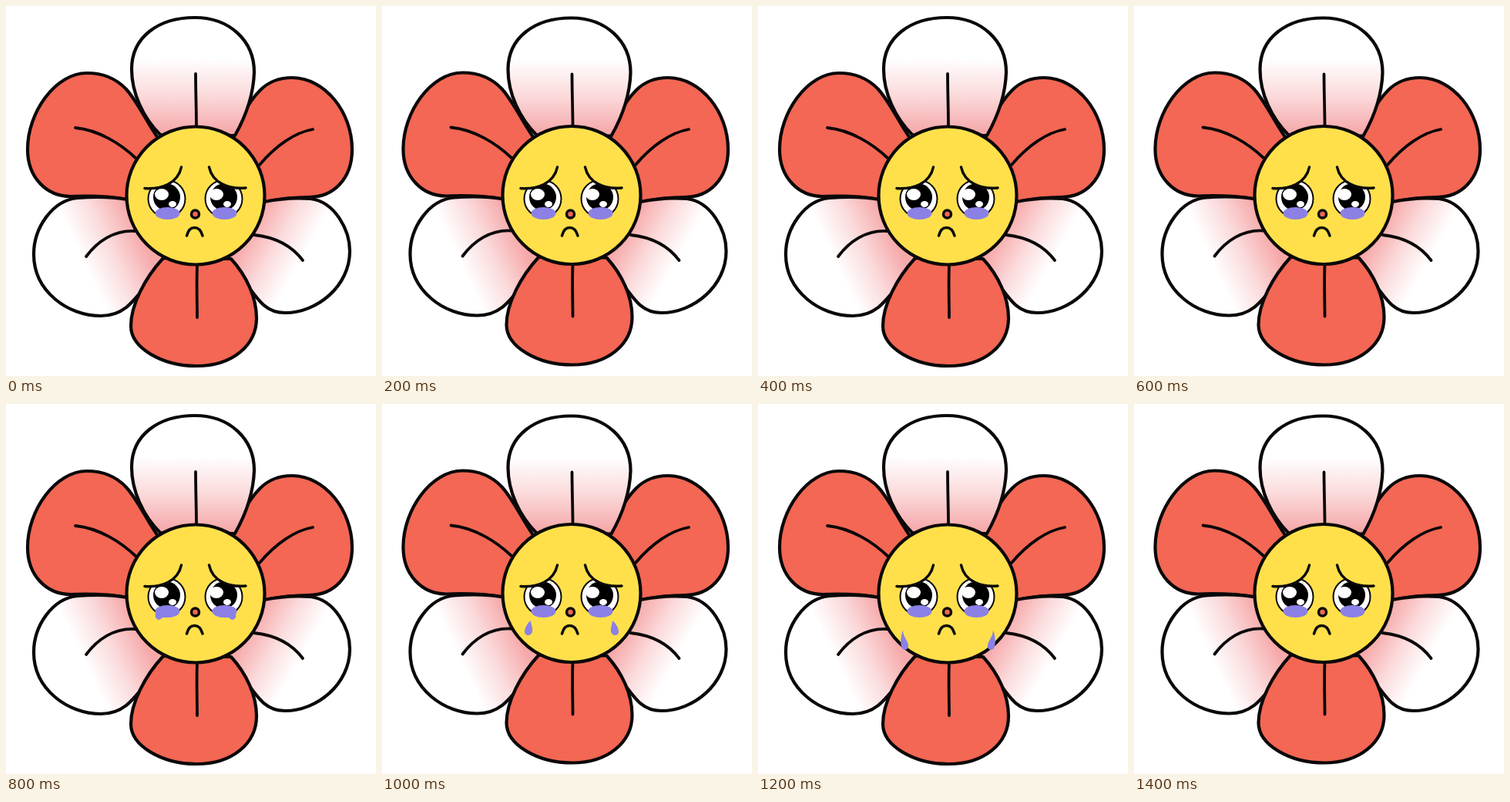
These frames come from a looping animation (480x480 px, 1.6 s). An HTML page:

```html
<!DOCTYPE html>
<html>
<head>
<meta charset="utf-8">
<style>
  html, body { margin: 0; width: 100%; height: 100%; overflow: hidden; background: #fff; }
  svg { display: block; width: 100vw; height: 100vh; }
  .ink { stroke: #0b0809; stroke-width: 4.2; stroke-linecap: round; stroke-linejoin: round; fill: none; }
  .vein { stroke-width: 3.8; }
  .red { fill: #f36754; }
  .tear { fill: #8b80e6; }
</style>
</head>
<body>
<svg viewBox="0 0 480 480">
  <defs>
    <linearGradient id="up" gradientUnits="userSpaceOnUse" x1="246" y1="164" x2="246" y2="68">
      <stop stop-color="#f5a8aa"/><stop offset=".5" stop-color="#fbdadb"/><stop offset="1" stop-color="#fff"/>
    </linearGradient>
    <linearGradient id="left" gradientUnits="userSpaceOnUse" x1="172" y1="292" x2="98" y2="327">
      <stop stop-color="#f6a9aa"/><stop offset=".5" stop-color="#fbdadb"/><stop offset="1" stop-color="#fff"/>
    </linearGradient>
    <linearGradient id="right" gradientUnits="userSpaceOnUse" x1="316" y1="291" x2="383" y2="329">
      <stop stop-color="#f6a9aa"/><stop offset=".5" stop-color="#fbdadb"/><stop offset="1" stop-color="#fff"/>
    </linearGradient>
    <clipPath id="lid">
      <path d="M180 237C202 239 223 230 228 209H245V290H170Z"/>
    </clipPath>
    <g id="eye" clip-path="url(#lid)">
      <circle class="ink" cx="208.500" cy="250" r="24" style="fill:#fff;stroke-width:2"/>
      <circle cx="208.500" cy="248" r="17.500"/>
    </g>
    <g id="shine" fill="#fff">
      <ellipse cx="202" cy="244.500" rx="9" ry="7.500"/>
      <ellipse cx="216" cy="257" rx="5" ry="4"/>
    </g>
  </defs>

  <g class="ink">
    <g data-shift="-.5 -.5">
      <path class="red" d="M202 178C184 155 173 127 156 108C141 92 123 87 105 87C64 87 28 138 28 186C28 222 52 247 84 247C112 246 135 247 158 251L200 225Z"/>
      <path class="vein" d="M90 158C120 161 148 178 169 198"/>
    </g>
    <g data-shift="0 0">
      <path class="red" d="M290 182C300 152 313 126 330 109C342 97 356 93 371 93C414 93 449 138 449 186C449 224 425 248 393 248C370 248 350 251 335 254L290 225Z"/>
      <path class="vein" d="M398 160C375 164 350 181 329 206"/>
    </g>
    <g data-shift=".5 .5">
      <path fill="url(#up)" d="M200 167C178 145 163 113 163 82C163 40 198 15 245 15C290 15 322 45 322 86C321 118 310 145 297 168Z"/>
      <path class="vein" d="M246 88C246 110 247 135 247 156"/>
    </g>
    <g data-shift=".5 -.5">
      <path fill="url(#left)" d="M157 251C135 247 115 247 93 249C60 252 36 288 36 322C36 370 80 402 123 402C163 402 172 368 210 330V290Z"/>
      <path class="vein" d="M104 325C118 306 140 290 168 292"/>
    </g>
    <g data-shift=".5 0">
      <path fill="url(#right)" d="M335 254C355 250 372 248 395 250C427 254 446 291 446 318C446 363 404 398 362 398C328 398 322 368 285 326V290Z"/>
      <path class="vein" d="M385 330C370 310 350 300 322 297"/>
    </g>
    <g data-shift="-.5 -1.5">
      <path class="red" d="M204 327C180 353 162 388 162 415C162 444 203 467 247 467C294 467 325 440 325 405C325 378 312 350 292 328Z"/>
      <path class="vein" d="M248 336C247 360 248 384 248 404"/>
    </g>
    <g data-shift="0 -.5"><circle cx="246" cy="246" r="89.5" fill="#ffe04b"/></g>
  </g>

  <use href="#eye"/>
  <use href="#eye" transform="matrix(-1 0 0 1 491 0)"/>
  <use href="#shine"/>
  <use href="#shine" x="71"/>
  <g class="ink" style="stroke-width:3.5">
    <path d="M180 236.500C202 238 223 230 227.500 209M263.500 209C268 230 289 238 311 236"/>
    <g data-shift="-1 0">
      <circle cx="245.500" cy="270" r="5" fill="#f36754"/>
      <path d="M234.500 298C238 284 251 284 255 298"/>
    </g>
  </g>

  <g class="tear">
    <ellipse cx="209.500" cy="269" rx="16" ry="8"/>
    <ellipse cx="283.500" cy="269" rx="16" ry="8"/>
    <g id="swell">
      <path d="M196 265Q193 270 194 277Q198 283 203 277Q222 278 225 268Q222 261 209 262Z"/>
      <path d="M296 265Q299 270 298 277Q294 283 289 277Q270 278 267 268Q271 261 284 262Z"/>
    </g>
    <g id="drops">
      <path d="M193 281C188 285 185 291 185 296C186 302 194 301 195 295C196 290 193 286 193 281Z"/>
      <path d="M299 281C304 285 307 291 307 296C306 302 298 301 297 295C296 290 299 286 299 281Z"/>
    </g>
    <g id="drips">
      <path d="M188 293C185 302 184 311 187 317C191 321 196 318 195 312C193 305 188 301 188 293Z"/>
      <path d="M305 293C308 302 309 311 306 317C302 321 297 318 298 312C300 305 305 301 305 293Z"/>
    </g>
  </g>
</svg>
<script>
  const STEP = 200, STEPS = 8;
  const wobbly = document.querySelectorAll('[data-shift]');
  const tearStep = { swell: 4, drops: 5, drips: 6 };

  function draw(now) {
    const step = Math.floor(now / STEP) % STEPS;
    for (const part of wobbly) {
      part.setAttribute('transform', step % 2 ? `translate(${part.dataset.shift})` : '');
    }
    for (const id in tearStep) {
      document.getElementById(id).style.display = step === tearStep[id] ? '' : 'none';
    }
  }

  let start;
  function tick(now) {
    start ??= now;
    draw(now - start);
    requestAnimationFrame(tick);
  }
  draw(0);
  requestAnimationFrame(tick);
</script>
</body>
</html>
```
